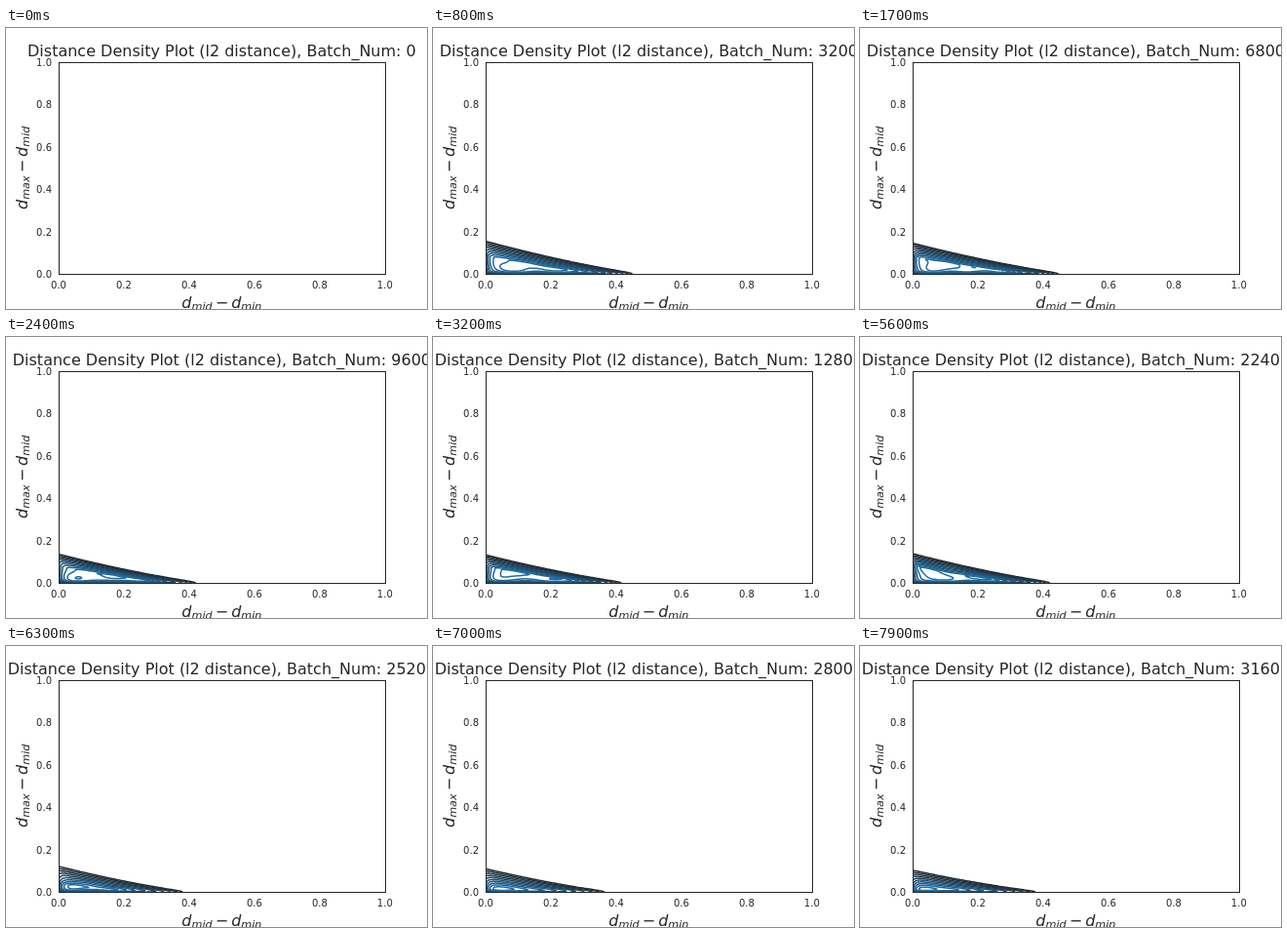
These frames come from a looping animation (432x288 px, 8000 ms). An HTML page:

```html
<!DOCTYPE html>
<html>
<head>
<meta charset="utf-8">
<style>
  html, body { margin: 0; width: 100%; height: 100%; overflow: hidden; background: #fff; }
  svg { display: block; width: 432px; height: 288px; }
  text { font: 10px "DejaVu Sans", sans-serif; fill: #262626; white-space: pre; }
  .title { font-size: 16px; text-anchor: middle; }
  .label { font-size: 16px; font-style: italic; text-anchor: middle; }
  .sub { font-size: 11.2px; }
  .minus { font-style: normal; }
  #contours { fill: none; stroke-width: 1.5; stroke-linecap: round; }
</style>
</head>
<body>
<svg viewBox="0 0 432 288">
  <clipPath id="area"><rect x="54" y="35" width="335" height="217.5"/></clipPath>
  <g id="contours" clip-path="url(#area)"></g>
  <rect x="54.5" y="35.5" width="335" height="217" fill="none" stroke="#262626"/>
  <g id="labels"></g>
  <text id="title" class="title" x="221.4" y="29"></text>
</svg>
<script>
const STEP = 100, STEPS = 80, LEVELS = 10;
const LEFT = 54, BASE = 252, DX = 2, DY = 0.75, COLS = 90, ROWS = 52;
const $ = id => document.getElementById(id);

// step, height, width, and plateau size of the density
const keys = [
  [1, 33, 155, 0.56], [17, 31.5, 149.5, 0.58], [32, 28.7, 139, 0.6], [44, 27.2, 134.5, 0.56],
  [56, 30, 140.5, 0.58], [70, 23.7, 122, 0.1], [79, 22.2, 126, 0.08]
];

function random(seed) {
  return () => {
    seed = (seed + 0x6D2B79F5) | 0;
    let t = Math.imul(seed ^ (seed >>> 15), 1 | seed);
    t = (t + Math.imul(t ^ (t >>> 7), 61 | t)) ^ t;
    return ((t ^ (t >>> 14)) >>> 0) / 4294967296;
  };
}

function shapeAt(step, rnd) {
  const i = Math.max(1, keys.findIndex(k => k[0] >= step));
  const a = keys[i - 1], b = keys[i];
  const u = (step - a[0]) / (b[0] - a[0]);
  const jitter = u > 0 && u < 1 ? 1 : 0;
  const [h, w, c] = [1, 2, 3].map(n => a[n] + (b[n] - a[n]) * u);
  return [h + jitter * (rnd() - 0.5) * 2.5, w + jitter * (rnd() - 0.5) * 9, c];
}

const wedge = s => s >= 1 ? 0 : 0.78 * (1 - s) ** 1.4 + 0.22 * Math.sqrt(1 - s);

// Size of the nested wedge whose edge passes through (x, y)
function radius(x, y, h, w) {
  let lo = 0, hi = 1.4;
  for (let i = 0; i < 14; i++) {
    const r = (lo + hi) / 2;
    if (y < h * r * wedge(x / (w * Math.sqrt(r)))) hi = r; else lo = r;
  }
  return hi;
}

function densityGrid(step) {
  const rnd = random(step * 977);
  const [h, w, c] = shapeAt(step, rnd);
  const waves = Array.from({ length: 5 }, () =>
    [0.05 + rnd() * 0.13, (rnd() - 0.5) * 0.8, rnd() * 6.28]);
  const amp = 0.008 + 0.03 * c;
  const grid = [];
  for (let j = 0; j <= ROWS; j++) {
    for (let i = 0; i <= COLS; i++) {
      const x = i * DX, y = j * DY;
      const r = radius(x, y, h, w);
      const p = Math.max(0, Math.min(0.93, 1 / 11 + (1 - r) / (1 - c) * 9 / 11));
      const noise = waves.reduce((sum, [kx, ky, ph]) => sum + Math.sin(kx * x + ky * y + ph), 0);
      const fade = 1 - (1 - 0.55 * Math.exp(-x / 5)) * (1 - 0.55 * Math.exp(-y / 1.5));
      grid.push(p * (1 - p * fade) + noise * amp * p * p);
    }
  }
  return grid;
}

function contour(grid, level) {
  let d = "";
  const point = n => {
    const i = n % (COLS + 1), j = (n - i) / (COLS + 1);
    return [LEFT + i * DX, BASE - j * DY];
  };
  const triangle = (...corners) => {
    const cuts = [];
    corners.forEach((a, n) => {
      const b = corners[(n + 1) % 3];
      if (grid[a] > level === grid[b] > level) return;
      const u = (level - grid[a]) / (grid[b] - grid[a]);
      const p = point(a), q = point(b);
      cuts.push(p.map((v, k) => (v + (q[k] - v) * u).toFixed(2)).join(" "));
    });
    if (cuts.length) d += "M" + cuts.join("L");
  };
  for (let j = 0; j < ROWS; j++) {
    for (let i = 0; i < COLS; i++) {
      const a = j * (COLS + 1) + i, b = a + COLS + 1;
      triangle(a, a + 1, b);
      triangle(a + 1, b + 1, b);
    }
  }
  return d;
}

function difference(first, second, place) {
  return `<text class="label" ${place}>d<tspan class="sub" dy="2.4">${first}</tspan>` +
    `<tspan class="minus" dx="3.1" dy="-2.4">\u2212</tspan><tspan dx="3.1">d</tspan>` +
    `<tspan class="sub" dy="2.4">${second}</tspan></text>`;
}

let labels = difference("mid", "min", 'x="221.4" y="287"') +
  difference("max", "mid", 'transform="translate(21.5 143.3) rotate(-90)"');
for (let i = 0; i <= 5; i++) {
  const value = (i / 5).toFixed(1);
  labels += `<text x="${54 + i * 66.96}" y="267" text-anchor="middle">${value}</text>` +
    `<text x="47" y="${256 - i * 43.4}" text-anchor="end">${value}</text>`;
}
$("labels").innerHTML = labels;

const lines = Array.from({ length: LEVELS }, (_, k) => {
  const path = document.createElementNS("http://www.w3.org/2000/svg", "path");
  const u = k / (LEVELS - 1);
  path.setAttribute("stroke", `rgb(${34 - 3 * u},${39 + 70 * u},${43 + 121 * u})`);
  return $("contours").appendChild(path);
});

function draw(step) {
  $("title").textContent = `Distance Density Plot (l2 distance), Batch_Num: ${step * 400}`;
  const grid = step ? densityGrid(step) : null;
  const low = 1 / 11, high = grid ? 0.94 * Math.max(...grid) : 0;
  lines.forEach((path, k) => path.setAttribute("d",
    grid ? contour(grid, low + (high - low) * k / (LEVELS - 1)) : ""));
}

const start = performance.now();
let shown = -1;
function tick() {
  const step = Math.floor((performance.now() - start) / STEP) % STEPS;
  if (step !== shown) draw(shown = step);
  requestAnimationFrame(tick);
}
tick();
</script>
</body>
</html>
```
